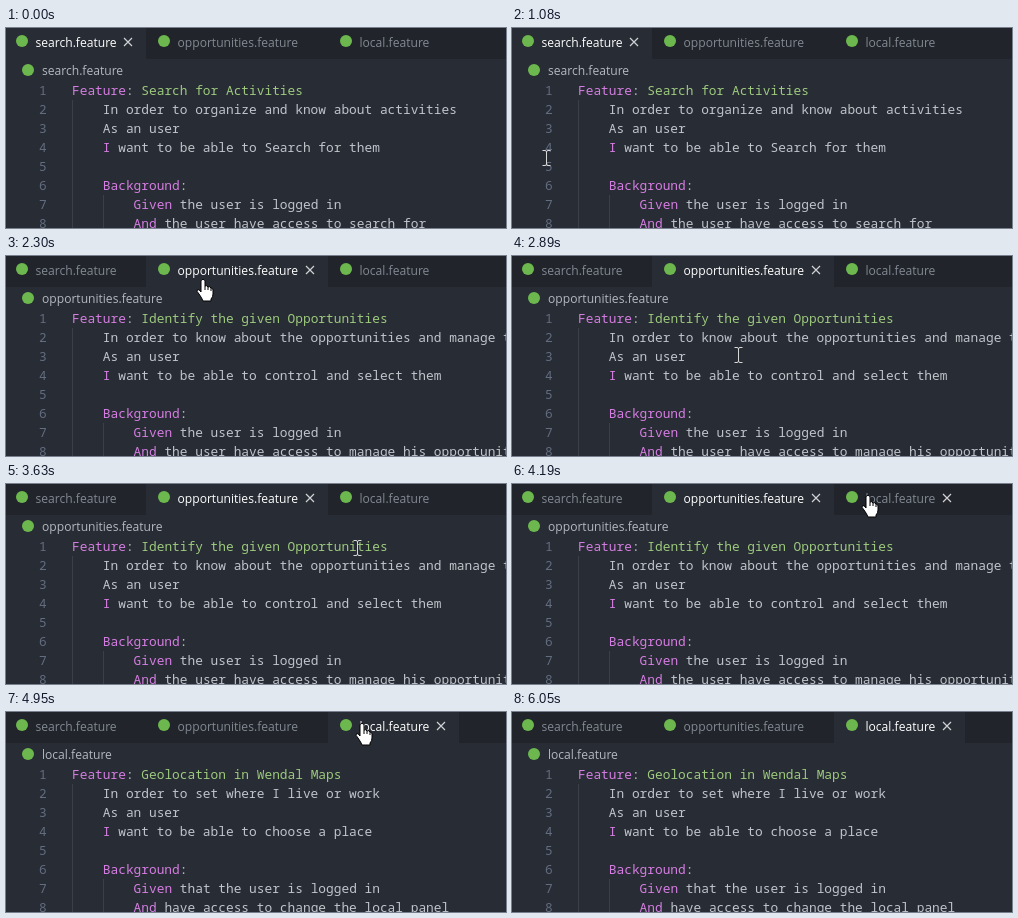
Animation, 500 px wide and 200 px high, one loop 6.72 s. Source, as an HTML page with a canvas:

```html
<!DOCTYPE html>
<html lang="en">
<head>
<meta charset="utf-8">
<title>Editor tabs</title>
<style>
  html, body { margin: 0; width: 500px; height: 200px; overflow: hidden; background: #282c34; }
  canvas { display: block; }
</style>
</head>
<body>
<canvas id="stage" width="500" height="200"></canvas>
<script>
const ctx = document.getElementById('stage').getContext('2d');
const LOOP = 6720, STEP = 110;
const UI = '12.1px "Open Sans", "Noto Sans", sans-serif';
const CODE = '12.83px "Noto Sans Mono", "DejaVu Sans Mono", monospace';
const CHAR = 7.7, LINE = 19, TAB_H = 31;
const KEYWORD = '#d57de2', TITLE = '#9dca7e', PLAIN = '#c0c4cb', ICON = '#6cb84e';

const tabs = [
  { name: 'search.feature', left: -2, right: 140, lines: [
    'Feature: Search for Activities',
    '    In order to organize and know about activities',
    '    As an user',
    '    I want to be able to Search for them',
    '',
    '    Background:',
    '        Given the user is logged in',
    '        And the user have access to search for'] },
  { name: 'opportunities.feature', left: 140, right: 322, lines: [
    'Feature: Identify the given Opportunities',
    '    In order to know about the opportunities and manage them',
    '    As an user',
    '    I want to be able to control and select them',
    '',
    '    Background:',
    '        Given the user is logged in',
    '        And the user have access to manage his opportunities'] },
  { name: 'local.feature', left: 322, right: 453, lines: [
    'Feature: Geolocation in Wendal Maps',
    '    In order to set where I live or work',
    '    As an user',
    '    I want to be able to choose a place',
    '',
    '    Background:',
    '        Given that the user is logged in',
    '        And have access to change the local panel'] }
];

// Each move eases the pointer from where it rests to a new spot
const start = { x: 34, y: 130 };
const moves = [
  { from: 1080, to: 1640, x: 197, y: 25 },
  { from: 1650, to: 1760, x: 198, y: 18 },
  { from: 2190, to: 2300, x: 197, y: 23 },
  { from: 2300, to: 2970, x: 228, y: 105 },
  { from: 2970, to: 3730, x: 358, y: 62 },
  { from: 3740, to: 4190, x: 356, y: 11 },
  { from: 4950, to: 6050, x: 357, y: 210 }
];

const hand = new Path2D('M-2 1.5Q0-1 2 1.5V7Q4 6 5 8Q7 7 8 9Q10 9 10 11V15Q10 18 8 20V22H0Q-1 19-4 15Q-7 12-5.5 10.5Q-4 10-2 13Z');
const knuckles = new Path2D('M2 7V11M5 8V11M8 9V12');
const arrow = new Path2D('M0 0V16L4 12L6.5 18L9 17L6.5 11.5H11.5Z');
const beam = new Path2D('M-3.5-7.5H-1Q.5-7.5.5-6Q.5-7.5 2-7.5H4.5M.5-6V6M-3.5 7.5H-1Q.5 7.5.5 6Q.5 7.5 2 7.5H4.5');
const cross = new Path2D('M-4-4L4 4M4-4L-4 4');

const within = (t, a, b) => t >= a && t < b;

function pointerAt(t) {
  let { x, y } = start;
  for (const m of moves) {
    if (t < m.from) break;
    const steps = Math.round((m.to - m.from) / STEP);
    const k = Math.min(1, Math.floor((t - m.from) / (m.to - m.from) * steps) / steps);
    const ease = k * k * (3 - 2 * k);
    x += (m.x - x) * ease;
    y += (m.y - y) * ease;
  }
  return { x: Math.round(x), y: Math.round(y) };
}

function rect(x, y, w, h, color) {
  ctx.fillStyle = color;
  ctx.fillRect(x, y, w, h);
}

function text(str, x, y, color, font) {
  ctx.font = font;
  ctx.fillStyle = color;
  ctx.fillText(str, x, y);
}

function dot(x, y, r, color) {
  ctx.fillStyle = color;
  ctx.beginPath();
  ctx.arc(x, y, r, 0, 7);
  ctx.fill();
}

function stroke(path, color, width = 1) {
  ctx.strokeStyle = color;
  ctx.lineWidth = width;
  ctx.stroke(path);
}

function drawAt(x, y, paint) {
  ctx.save();
  ctx.translate(x, y);
  paint();
  ctx.restore();
}

function drawTab({ left, right, name }, active, hovered) {
  if (active) rect(left, 0, right - left, TAB_H, '#282c34');
  dot(left + 18, 13, 6, ICON);
  text(name, left + 31.5, 19, active ? '#fff' : '#828992', UI);
  if (active || hovered) drawAt(right - 18, 14, () => stroke(cross, '#d0d2d6', 1.2));
}

function drawLine(line, i) {
  const y = 67 + i * LINE;
  text(i + 1, 33, y, '#636d80', CODE);
  const body = line.trim();
  const key = (body.match(/^(Feature|Background|Given|And|I(?= ))/) || [''])[0];
  const colon = body[key.length] === ':' ? ':' : '';
  const x = 66 + (line.length - body.length) * CHAR;
  const rest = key.length + colon.length;
  text(key, x, y, KEYWORD, CODE);
  text(colon, x + key.length * CHAR, y, PLAIN, CODE);
  text(body.slice(rest), x + rest * CHAR, y, i ? PLAIN : TITLE, CODE);
}

function drawPointer({ x, y }) {
  drawAt(x, y, () => {
    if (y >= 53) return stroke(beam, '#d8d8d8');
    const shape = y < TAB_H ? hand : arrow;
    ctx.fillStyle = '#fff';
    ctx.fill(shape);
    stroke(shape, '#000');
    if (shape === hand) stroke(knuckles, '#000');
  });
}

function draw(t) {
  const active = t < 2300 ? 0 : t < 4950 ? 1 : 2;
  const pos = pointerAt(t);
  const visible = within(t, 1080, 6050);
  rect(0, 0, 500, 200, '#282c34');
  rect(0, 0, 500, TAB_H, '#21252b');
  tabs.forEach((tab, i) => {
    const hovered = visible && pos.y < TAB_H && within(pos.x, tab.left, tab.right);
    drawTab(tab, i === active, hovered);
  });

  const { name, lines } = tabs[active];
  dot(22, 42, 6, ICON);
  text(name, 36, 47, '#b4b9c1', UI);
  rect(66, 72, 1, 128, '#3a3f48');
  rect(97, 167, 1, 33, '#3a3f48');
  lines.forEach(drawLine);

  if (within(t, 4510, 4840)) {
    rect(366, 27, 140, 22, '#767676');
    rect(367, 28, 140, 20, '#fff');
    text('c:\\projects\\features\\local.feature', 372, 42, '#575757', UI);
  }
  const clicking = within(t, 1980, 2080) || within(t, 4840, 4950);
  if (clicking) dot(pos.x, pos.y, 12, 'rgba(255,255,0,.47)');
  if (visible) drawPointer(pos);
}

function tick() {
  draw(performance.now() % LOOP);
  requestAnimationFrame(tick);
}
tick();
</script>
</body>
</html>
```
